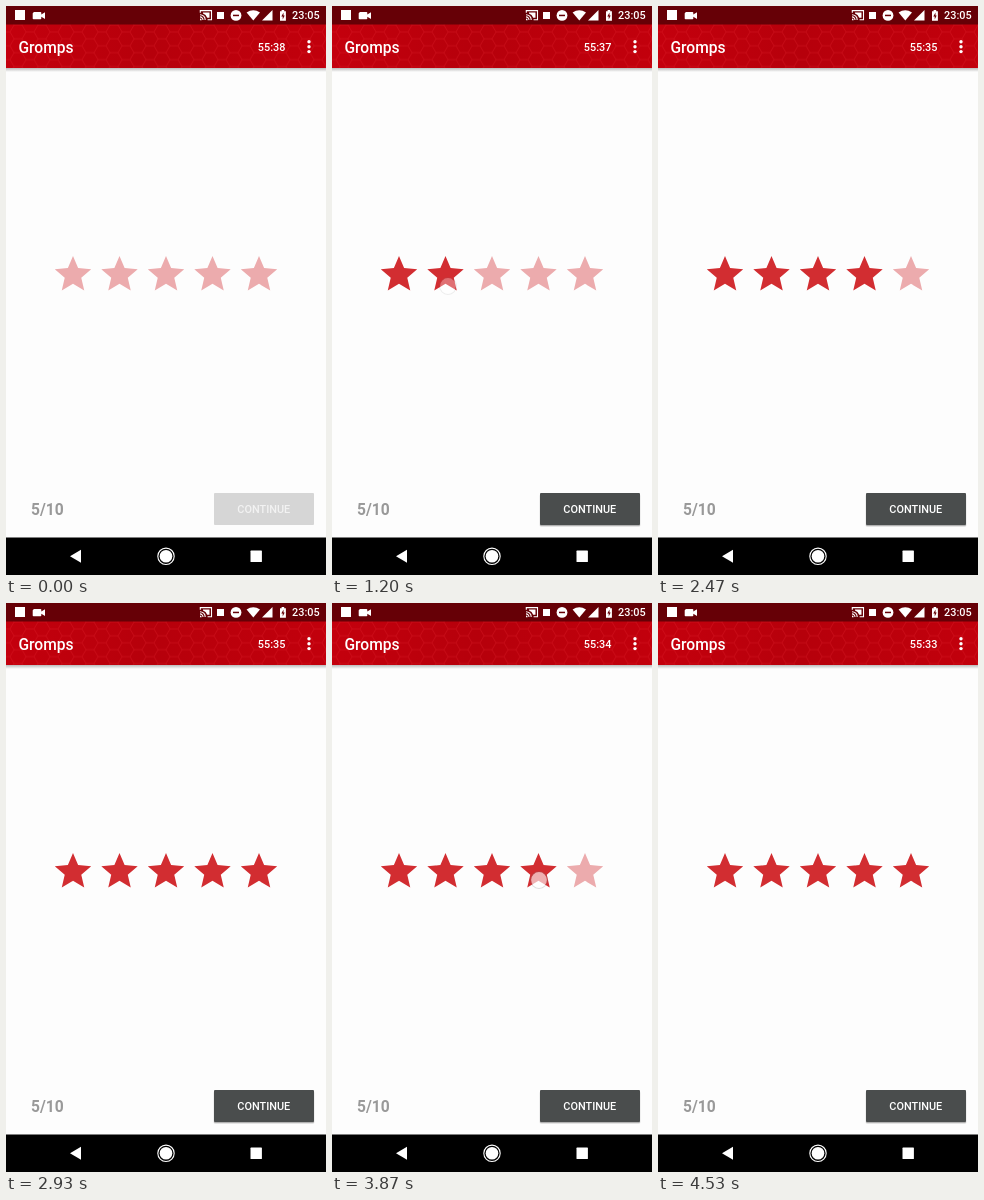
These frames come from a looping animation (320 by 569 pixels, 4.59 s). An HTML page:

```html
<!DOCTYPE html>
<html lang="en">
<head>
<meta charset="utf-8">
<title>Star rating</title>
<style>
  html, body { margin: 0; width: 100%; height: 100%; overflow: hidden; background: #fdfdfd; }
  svg { display: block; width: 100%; height: 100%; }
  text { font-family: Roboto, sans-serif; font-weight: 500; fill: #fff; }
</style>
</head>
<body>
<svg viewBox="0 0 320 569">
  <defs>
    <pattern id="comb" width="24" height="13.86" patternUnits="userSpaceOnUse" patternTransform="translate(4 19)">
      <path d="M0 6.93 4 0H12L16 6.93 12 13.86H4ZM16 6.93H24" fill="none" stroke="#e0202c" stroke-opacity=".42" stroke-width=".8"/>
    </pattern>
    <linearGradient id="bar">
      <stop offset="0" stop-color="#c4000d"/>
      <stop offset=".45" stop-color="#b6000b"/>
      <stop offset="1" stop-color="#c2000c"/>
    </linearGradient>
    <linearGradient id="shade" x2="0" y2="1">
      <stop offset="0" stop-opacity=".26"/>
      <stop offset="1" stop-opacity="0"/>
    </linearGradient>
    <path id="star" d="M12 17.27 18.18 21l-1.64-7.03L22 9.24l-7.19-.61L12 2 9.19 8.63 2 9.24l5.46 4.73L5.82 21z"/>
  </defs>

  <rect width="320" height="569" fill="#fdfdfd"/>
  <rect y="62" width="320" height="4" fill="url(#shade)"/>
  <rect y="18" width="320" height="44" fill="url(#bar)"/>
  <rect y="18" width="320" height="44" fill="url(#comb)"/>
  <rect width="320" height="18.5" fill="#660006"/>

  <!-- status bar -->
  <g fill="#fff">
    <rect x="9" y="4" width="10" height="10"/>
    <path d="M27.5 6h7q.8 0 .8 .8v1.6l3.7-2.2v6.8l-3.7-2.2v1.6q0 .8-.8 .8h-7q-.8 0-.8-.8v-4.8q0-.8 .8-.8z"/>
    <g fill="none" stroke="#fff" stroke-width="1.1">
      <path d="M194.3 6.8V4.6H205.5V13.8H201.6M194 8.7a5.2 5.2 0 0 1 5.2 5.2M194 10.9a3 3 0 0 1 3 3"/>
    </g>
    <path d="M194 12.6a1.7 1.7 0 0 1 1.7 1.7H194zM197 6.6H203.5V11.8H201.2A7.2 7.2 0 0 0 197 7.6z"/>
    <rect x="211" y="6" width="7" height="7"/>
    <circle cx="230" cy="9.4" r="5.4"/>
    <rect x="227" y="8.7" width="6" height="1.5" fill="#660006"/>
    <path d="M240.6 6.6Q247.3 1.7 254 6.6L247.3 14.6z"/>
    <path d="M266.5 4V14.4H256z"/>
    <path d="M274 5.2h1.6V4h2.6v1.2h1.7v9.6H274z"/>
    <path d="M277.5 6.6 275.3 10.6H276.7V13.4L278.7 9.4H277.5z" fill="#660006"/>
  </g>
  <text x="286" y="13.4" font-size="10.9">23:05</text>

  <!-- toolbar -->
  <text x="12.5" y="46.6" font-size="15.6">Gromps</text>
  <text id="timer" x="251.8" y="44.7" font-size="10.9">55:38</text>
  <g fill="#fff">
    <circle cx="303" cy="35.8" r="1.7"/>
    <circle cx="303" cy="40.7" r="1.7"/>
    <circle cx="303" cy="45.6" r="1.7"/>
  </g>

  <g id="stars"></g>

  <!-- footer -->
  <text x="25" y="509.2" font-size="15.6" style="font-weight:700;fill:#999">5/10</text>
  <g id="lift">
    <rect x="207.5" y="488" width="101" height="33" rx="2" fill-opacity=".1"/>
    <rect x="208" y="488" width="100" height="32" rx="1" fill-opacity=".22"/>
  </g>
  <rect id="button" x="208" y="487" width="100" height="32" rx="1"/>
  <text id="label" x="257.8" y="507" font-size="10.9" text-anchor="middle">CONTINUE</text>

  <!-- navigation bar -->
  <rect y="531.5" width="320" height="37.5"/>
  <g fill="#fff">
    <path d="M64 550.3 75 543.8V556.8z"/>
    <circle cx="160" cy="550.3" r="6.3"/>
    <circle cx="160" cy="550.3" r="8.2" fill="none" stroke="#fff" stroke-width="1.1"/>
    <rect x="244.5" y="544.6" width="11.4" height="11.4" rx=".6"/>
  </g>

  <g id="touch">
    <circle r="8.4" fill="none" stroke="#777" stroke-opacity=".3" stroke-width="1.2"/>
    <circle r="7.9" fill="#fff" fill-opacity=".8"/>
  </g>
</svg>
<script>
  const LOOP = 4590;
  const SCALE = 1.82;
  const $ = id => document.getElementById(id);

  // start time, rating given, touch x, touch y
  const taps = [
    [670, 1, 76, 274],
    [1070, 2, 116, 280],
    [1540, 3, 162, 280],
    [2070, 4, 208, 275],
    [2670, 5, 256, 284],
    [3130, 2, 114, 277],
    [3800, 4, 207, 277],
    [4270, 5, 252.5, 271.5]
  ];
  // touch opacity by time since the tap began
  const fade = [[0, .85], [60, .78], [130, .4], [200, .12], [260, 0]];
  const PRESS = 60;

  const stars = Array.from({ length: 5 }, (_, i) => {
    const star = document.createElementNS('http://www.w3.org/2000/svg', 'use');
    const x = 67 + 46.5 * i - 12 * SCALE;
    star.setAttribute('href', '#star');
    star.setAttribute('transform', `translate(${x} ${250 - 2 * SCALE}) scale(${SCALE})`);
    $('stars').append(star);
    return star;
  });

  const latest = (rows, t) => rows.filter(row => row[0] <= t).pop();

  function draw(t) {
    const rated = latest(taps, t - PRESS);
    const rating = rated ? rated[1] : 0;
    stars.forEach((star, i) => star.setAttribute('fill', i < rating ? '#d22d31' : '#ecabad'));

    $('button').setAttribute('fill', rated ? '#4a4d4d' : '#d6d6d6');
    $('label').style.fill = rated ? '#fff' : '#f2f2f2';
    $('lift').style.opacity = rated ? 1 : 0;

    $('timer').textContent = '55:' + (38 - Math.floor((t + 530) / 1000));

    const tap = latest(taps, t);
    $('touch').style.opacity = tap ? latest(fade, t - tap[0])[1] : 0;
    if (tap) $('touch').setAttribute('transform', `translate(${tap[2]} ${tap[3]})`);
  }

  const start = performance.now();
  function tick() {
    draw((performance.now() - start) % LOOP);
    requestAnimationFrame(tick);
  }
  tick();
</script>
</body>
</html>
```
